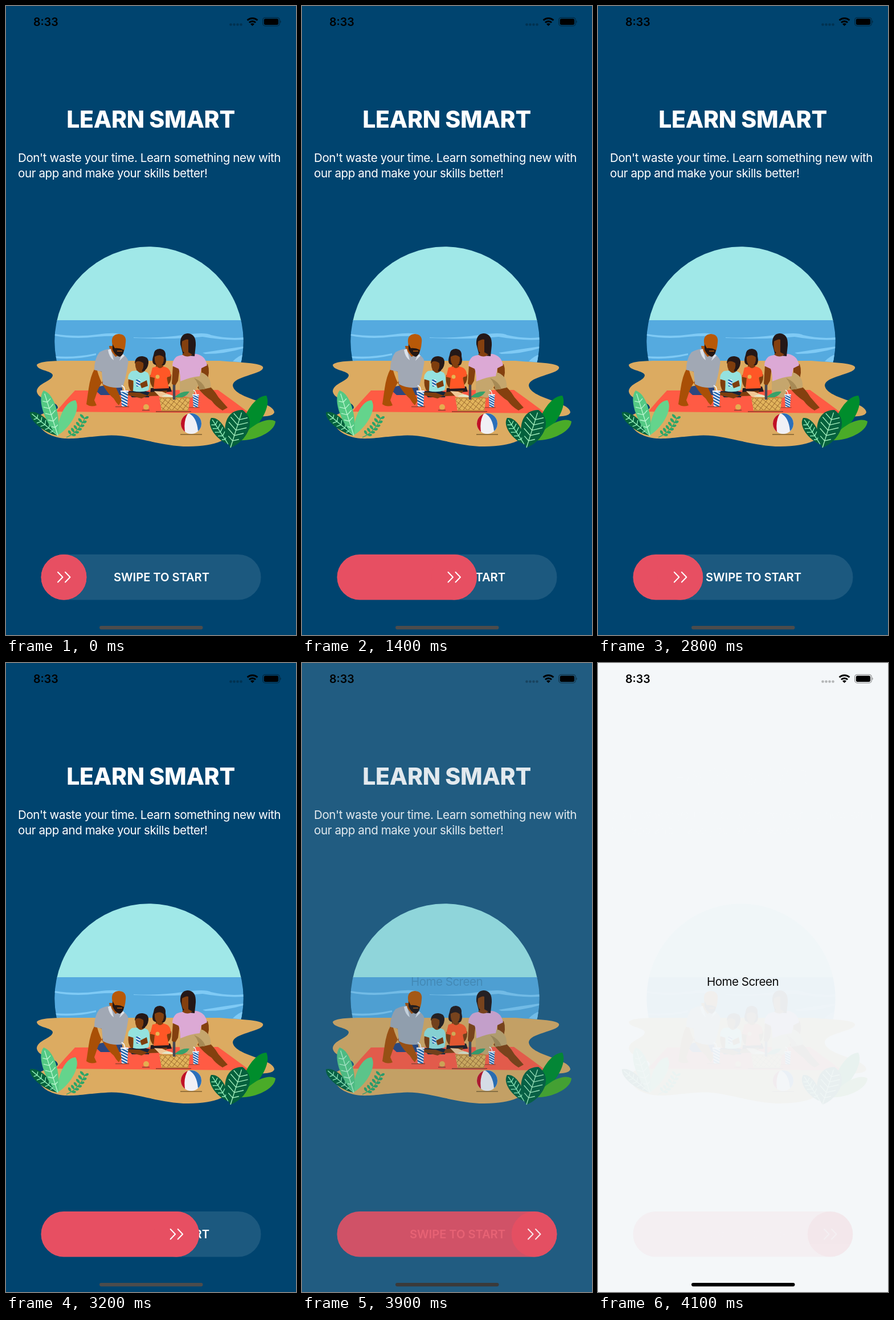
Recreate the animation shown at these times as an HTML page. Size 509 px wide and 1101 px high, loop 4200 ms.

```html
<!DOCTYPE html>
<html lang="en">
<head>
<meta charset="utf-8">
<title>Swipe to start</title>
<style>
  html, body { margin: 0; width: 100%; height: 100%; overflow: hidden; background: #fff; }
  svg { display: block; width: 100%; height: 100%; font-family: Inter, "Open Sans", sans-serif; }
  .fade { opacity: var(--keep, 1); }
  .title { font-size: 41px; font-weight: 800; letter-spacing: -.35px; }
  .body { font-size: 20.6px; font-weight: 400; letter-spacing: -.42px; }
  .swipe { font-size: 20.2px; font-weight: 600; letter-spacing: -.05px; }
  .home { font-size: 20.6px; letter-spacing: -.55px; }
  .clock { font-size: 19.6px; font-weight: 600; }
</style>
</head>
<body>
<svg viewBox="0 0 509 1101">
  <defs>
    <clipPath id="sun"><circle cx="251" cy="587" r="165.7"/></clipPath>
    <clipPath id="ballEdge"><circle cx="325" cy="731" r="18"/></clipPath>
    <pattern id="stripes" width="5" height="4.6" patternUnits="userSpaceOnUse" patternTransform="rotate(28)">
      <path fill="#f4f8ff" d="M0 0h5v5H0z"/><path fill="#165da8" d="M0 0h5v2.5H0z"/>
    </pattern>
    <pattern id="weave" width="7" height="7" patternUnits="userSpaceOnUse" patternTransform="rotate(38)">
      <path fill="#e2b45c" d="M0 0h7v7H0z"/><path stroke="#98662a" stroke-width="1.7" fill="none" d="M0 0H7M0 0V7"/>
    </pattern>
    <g id="cup">
      <path fill="none" stroke="#f4f8ff" stroke-width="1.6" d="M1-13L-1-20L-5-23"/>
      <path fill="url(#stripes)" d="M-6.5-13H6.5L5 14H-5Z"/>
      <path fill="#f4f8ff" d="M-7-14H7V-11.5H-7Z"/>
      <path stroke="#8a3f2c" stroke-width="1.3" d="M-16 14.5H8"/>
    </g>
  </defs>

  <rect class="fade" width="509" height="1101" fill="#00446f"/>
  <g fill="#fff">
    <text class="fade title" x="254" y="213" text-anchor="middle">LEARN SMART</text>
    <text class="fade body" x="21" y="273">Don't waste your time. Learn something new with</text>
    <text class="fade body" x="21" y="300">our app and make your skills better!</text>
  </g>

  <g class="fade">
    <g clip-path="url(#sun)">
      <path fill="#a0e8e8" d="M80 420H420V551H80Z"/>
      <path fill="#55aadf" d="M80 550H420V640H80Z"/>
      <g fill="#7fcaf5">
        <path d="M85 574Q125 580 160 575T205 576V578Q180 577 158 579Q120 584 85 577Z"/>
        <path d="M224 580Q270 582 310 576T360 576Q390 583 417 580V584Q385 586 345 579Q300 584 224 581Z"/>
        <path d="M85 613Q120 616 158 608V611Q120 620 85 616Z"/>
        <path d="M345 607Q380 601 417 596V599Q385 609 350 609Z"/>
        <path d="M398 622Q408 612 417 610V624Z"/>
      </g>
    </g>
    <path fill="#dcab61" d="M54 628C59 622 80 621 105 621H375C405 624 455 624 451 634C448 645 399 648 398 664C400 687 469 692 471 711C468 721 448 716 433 722C405 735 400 771 320 771C270 771 230 752 185 751.500C145 753 130 758 103 757C72 754 50 738 60 717C66 709 91 711 91 702C88 690 57 691 54 675C54 660 82 657 82 646C80 638 54 638 54 628Z"/>
    <path fill="#ff5b44" d="M121 673L372 672Q400 692 428 713L88 710Q103 692 121 673Z"/>

    <!-- father -->
    <path fill="#2c477f" d="M154 670Q178 658 204 668L205 681L166 681Z"/>
    <path fill="#a94f06" d="M156 634Q148 648 145 670L141 697Q149 703 159 699L155 690L162 670L176 645ZM160 638L178 638L190 661L203 690L198 699Q193 694 189 687Q169 670 160 638ZM181 595H205V616H185Z"/>
    <path fill="#a1a8b4" d="M164 606Q173 601 182 600L192 614L204 609Q217 617 214 627Q211 648 205 667Q188 671 170 662L168 640L155 637Q155 617 164 606Z"/>
    <path fill="#dce2ea" d="M179 602L184 600L189 620Q181 615 179 602ZM204 608L208 612L199 621Z"/>
    <path fill="#b85908" d="M186 588Q185 575 198 574Q212 575 210 589Q209 604 203 611Q193 613 188 604Z"/>
    <path fill="#241713" d="M187 592L191 599Q199 598 207 602Q206 612 199 614Q190 610 187 601Z"/>
    <path stroke="#b85908" stroke-width="1.5" d="M195 604H204"/>

    <!-- mother -->
    <path fill="#84400f" d="M293 629L305 632L302 656L296 666L291 661ZM342 624L354 627Q359 641 352 657L344 656ZM345 655Q364 669 373 685L389 703L380 708Q368 701 361 691Q348 683 336 668Z"/>
    <path fill="#c5a66d" d="M305 654Q322 642 345 642Q361 650 359 668L346 671L337 663L326 686L305 682Z"/>
    <path fill="#a78a55" d="M330 651Q346 658 350 670L339 672Q338 660 330 651Z"/>
    <path fill="#dca9d5" d="M299 614Q309 609 334 609Q350 612 353 629L343 634L340 648Q325 649 306 657Q306 643 303 635L292 630Q292 620 299 614Z"/>
    <path fill="#251817" d="M306 592Q305 574 319 573Q334 574 333 594L331 613L311 611Z"/>
    <path fill="#84400f" d="M309 587Q317 582 320 584V606L327 610Q319 617 309 610L313 607Q307 603 309 587Z"/>

    <!-- boy -->
    <path fill="#15243a" d="M213 675Q233 670 253 676L251 685H221Z"/>
    <path fill="#7e3d0d" d="M214 676L235 677L249 682L238 687L213 681ZM215 652L223 654L224 665L234 661L236 667L220 675Q213 667 215 652ZM229 631H244V643H229Z"/>
    <path fill="#94e2df" d="M221 639L230 638Q237 646 243 639L249 642Q255 652 250 673Q236 677 223 674L224 656L214 653Q214 643 221 639Z"/>
    <path fill="#251817" d="M226 625Q227 613 239 613Q251 614 250 625Q249 636 240 640Z"/>
    <path fill="#7e3d0d" d="M227 624Q232 619 241 625Q243 634 236 641Q226 639 227 624ZM235 661L247 655L249 665L238 669Z"/>
    <path fill="url(#stripes)" d="M228 654H236L235 666H229Z"/>

    <!-- girl -->
    <path fill="#221b20" d="M254 669L288 666L291 675L253 678Z"/>
    <path fill="#7e3d0d" d="M253 646L260 644L262 656L269 651L271 657L258 668Q251 660 253 646ZM284 644L290 645Q291 660 282 665L265 657L269 651L281 657ZM252 676L283 673L279 682L248 683ZM263 625H276V637H263Z"/>
    <path fill="#ff5726" d="M257 633L265 631Q270 637 276 631Q290 633 289 648L282 650L286 669L259 670L261 651L253 649Z"/>
    <path fill="#251817" d="M259 611Q260 600 270 600Q281 601 280 613Q283 625 277 629L262 628Q254 626 259 611Z"/>
    <path fill="#84400f" d="M261 614Q270 608 277 615Q278 628 269 631Q260 628 261 614Z"/>
    <circle cx="266" cy="649" r="3.5" fill="#e6b653"/>

    <use href="#cup" x="208" y="687"/>
    <use href="#cup" transform="translate(333 691) scale(.82)"/>
    <circle cx="246" cy="702" r="5" fill="#e5ad50"/>
    <path stroke="#8a3f2c" stroke-width="1.3" d="M239 707.500H252M263 710H325"/>

    <!-- basket -->
    <path fill="#f1c796" d="M260 674L274 675L293 683L290 688L270 684Z"/>
    <path fill="#38a169" d="M296 684Q309 673 322 675Q316 685 302 687Z"/>
    <path fill="#dfe8cc" d="M273 683Q286 676 297 685Z"/>
    <path fill="url(#weave)" d="M269 685H323L320 709H273Z"/>
    <path fill="none" stroke="#c68e3d" stroke-width="2" d="M269 686H323M273 708H320"/>
    <path stroke="#474855" stroke-width="4.500" d="M295 663V689"/>

    <!-- ball -->
    <path stroke="#80612f" stroke-width="1.5" d="M306 750H344"/>
    <g clip-path="url(#ballEdge)">
      <path fill="#f0f0f5" d="M306 712H344V750H306Z"/>
      <path fill="#c01025" d="M320 712Q310 727 315 750H306V712Z"/>
      <path fill="#2b6fb9" d="M321 713Q335 720 337 744L346 738V710Z"/>
    </g>
    <g id="plants"></g>
  </g>

  <g>
    <rect class="fade" x="61.500" y="960" width="386" height="79.500" rx="39.750" fill="#fff" fill-opacity=".11"/>
    <text class="fade swipe" x="273" y="1007" text-anchor="middle" fill="#fff">SWIPE TO START</text>
    <rect class="fade" id="pill" x="61.500" y="960" width="80" height="79.500" rx="39.750" fill="#e74f62"/>
    <g class="fade" id="knob">
      <circle cx="101.500" cy="999.750" r="39.750" fill="#e74f62"/>
      <path d="M91 991L99.500 999.700L91 1008.500M104 991L112.500 999.700L104 1008.500" fill="none" stroke="#fff" stroke-width="2" stroke-linecap="round" stroke-linejoin="round"/>
    </g>
  </g>

  <text class="home" id="home" x="254" y="564.500" text-anchor="middle" opacity="0">Home Screen</text>

  <text class="clock" x="48" y="35">8:33</text>
  <g opacity=".26">
    <circle cx="394.500" cy="32.500" r="2.300"/><circle cx="400.500" cy="32.500" r="2.300"/>
    <circle cx="406.500" cy="32.500" r="2.300"/><circle cx="412.500" cy="32.500" r="2.300"/>
  </g>
  <path fill="none" stroke="#000" stroke-width="3" d="M423.600 25A13 13 0 0 1 441.400 25M426.900 29A8.200 8.200 0 0 1 438.100 29"/>
  <path d="M432.500 35L429 31.600A5 5 0 0 1 436 31.600Z"/>
  <rect x="450.700" y="20.300" width="29.500" height="14.600" rx="4.300" fill="none" stroke="#000" stroke-opacity=".4" stroke-width="1.300"/>
  <rect x="452.800" y="22.300" width="25.300" height="10.600" rx="2.600"/>
  <path fill-opacity=".45" d="M481.400 25Q484 27.500 481.400 30Z"/>
  <rect id="bar" x="164" y="1085" width="181.500" height="6.200" rx="3.100"/>
</svg>

<script>
const $ = id => document.getElementById(id);

// A leaf from its base to its tip, widest past the middle; `bulge` sets the width, `vein` the optional rib colour.
function leaf(baseX, baseY, tipX, tipY, bulge, fill, vein) {
  const length = Math.hypot(tipX - baseX, tipY - baseY);
  const angle = Math.atan2(tipY - baseY, tipX - baseX) * 180 / Math.PI;
  const near = length * .25, far = length * .85, low = bulge * .75, high = bulge * 1.1;
  let ribs = '';
  if (vein) {
    let d = `M0 0H${length * .93}`;
    for (let u = .18; u < .85; u += .14) {
      const reach = 2.2 * u * (1 - u) * bulge, x = u * length;
      for (const side of [-1, 1]) d += `M${x} 0L${x + reach * .6} ${side * reach}`;
    }
    ribs = `<path d="${d}" stroke="${vein}" stroke-width="1.4"/>`;
  }
  return `<g transform="translate(${baseX} ${baseY}) rotate(${angle})">
    <path fill="${fill}" d="M0 0C${near} ${-low} ${far} ${-high} ${length} 0C${far} ${high} ${near} ${low} 0 0Z"/>${ribs}</g>`;
}

function sprig() {
  let out = '<path d="M106 755Q128 746 139 720" fill="none" stroke="#2aa568" stroke-width="1.2"/>';
  for (let i = 0; i < 6; i++) {
    const u = .2 + i * .15, v = 1 - u;
    const x = v * v * 106 + 2 * u * v * 128 + u * u * 139;
    const y = v * v * 755 + 2 * u * v * 746 + u * u * 720;
    out += leaf(x, y, x - 4 - u * 4, y - 8, 3.2, '#2aa568') + leaf(x, y, x + 9 - u * 2, y + 1 - u * 5, 3.2, '#2aa568');
  }
  return out;
}

$('plants').innerHTML =
  leaf(91, 752, 42, 711, 13, '#04613d', '#91edb8') +
  leaf(91, 751, 122, 690, 16, '#64d48c') +
  leaf(91, 752, 66, 673, 17, '#54c984', '#b5f5cc') +
  sprig() +
  leaf(408, 762, 457, 682, 20, '#008d2c') +
  leaf(410, 760, 473, 727, 16, '#4aab28') +
  leaf(390, 767, 360, 721, 15, '#04613d', '#91edb8') +
  leaf(394, 773, 415, 707, 30, '#04613d', '#a5efbd');

const LOOP = 4200, STEP = 100, END = 306, FIRST = 172, SECOND = 235;
const FADE_START = 3900, FADE = [.13, .49, .955];
const progress = (t, from, to) => Math.min(1, Math.max(0, (t - from) / (to - from)));
const easeInOut = p => (1 - Math.cos(Math.PI * p)) / 2;
const easeOut = p => 1 - (1 - p) ** 1.8;

function knobOffset(t) {
  if (t < 1700) return FIRST * easeInOut(progress(t, 700, 1500));
  if (t < 2800) return FIRST * (1 - easeOut(progress(t, 1600, 2000)));
  if (t < 3400) return SECOND * progress(t, 2700, 3300) ** .95;
  return SECOND + (END - SECOND) * easeOut(progress(t, 3300, 3700));
}

function draw(now) {
  const t = Math.floor(now % LOOP / STEP) * STEP;
  const offset = knobOffset(t);
  const fade = t < FADE_START ? 0 : FADE[(t - FADE_START) / STEP];
  const grey = 76 * (1 - fade) ** 2;
  $('pill').setAttribute('width', 80 + offset);
  $('knob').setAttribute('transform', `translate(${offset} 0)`);
  $('home').setAttribute('opacity', fade);
  $('bar').setAttribute('fill', `rgb(${grey},${grey},${grey})`);
  document.documentElement.style.setProperty('--keep', 1 - fade);
  requestAnimationFrame(draw);
}
draw(performance.now());
</script>
</body>
</html>
```
